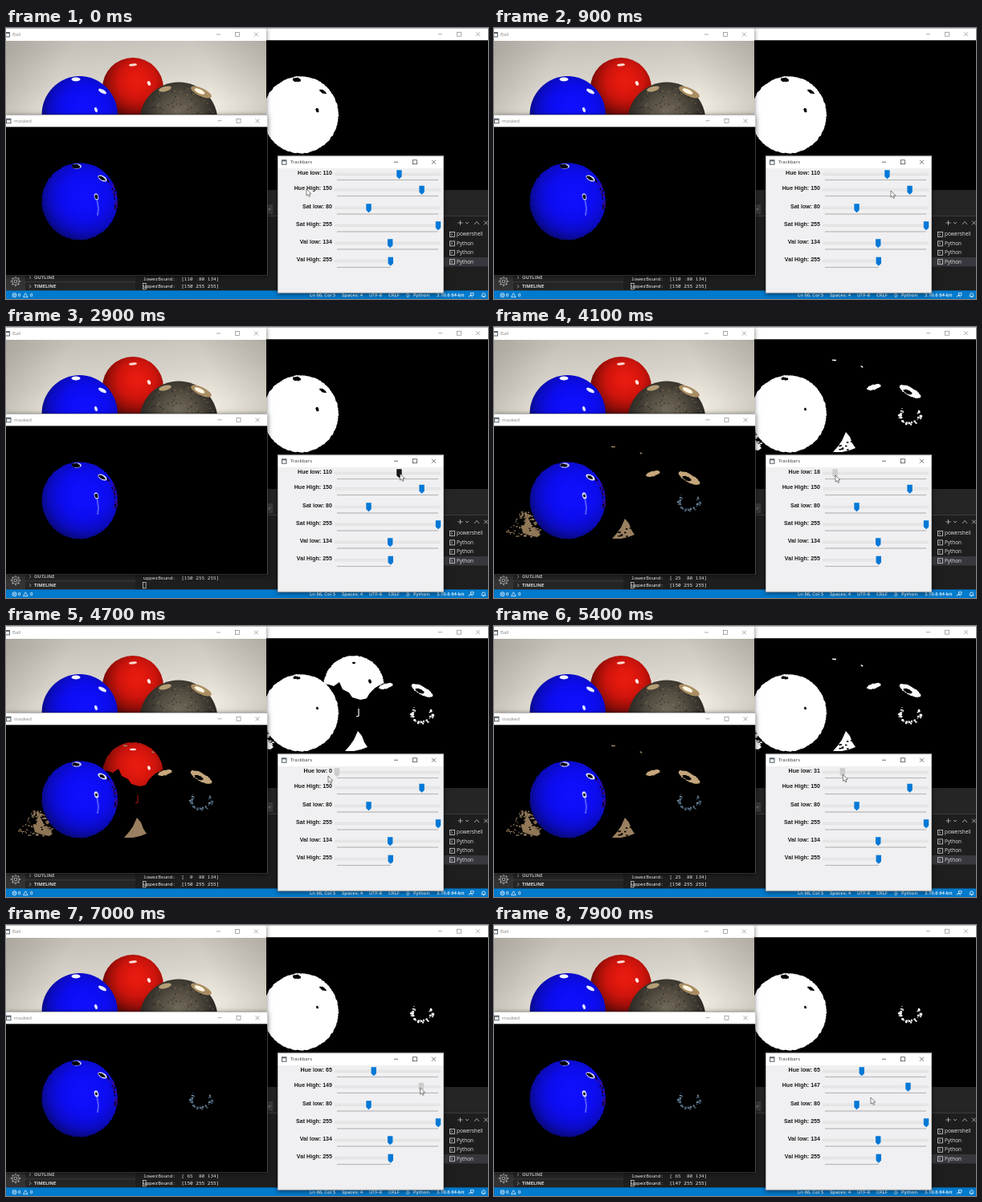
These frames come from a looping animation (600x338 px, 8 s). An HTML page with a canvas:

```html
<!DOCTYPE html>
<html lang="en">
<head>
<meta charset="utf-8">
<title>HSV trackbars</title>
<style>
html, body { margin: 0; width: 100%; height: 100%; overflow: hidden; background: #1e1e1e; }
canvas { display: block; width: 100vw; height: 100vh; }
</style>
</head>
<body>
<canvas id="stage" width="600" height="338"></canvas>
<script>
const ctx = document.getElementById('stage').getContext('2d');
const LOOP = 8000, STEP = 100;
const SANS = '"Open Sans", sans-serif';
const MONO = '"Noto Sans Mono", monospace';

// time, x, y of the pointer tip
const pointerKeys = [
  [0, 374, 201], [300, 374, 201], [900, 494, 203], [1300, 532, 194], [1800, 532, 194],
  [2500, 490.5, 183], [3400, 490.5, 183], [4000, 430, 185], [4100, 425, 185],
  [4400, 401, 187], [4800, 401, 187], [5200, 425, 186], [5900, 458, 184],
  [6200, 516, 203], [6900, 516, 203], [7400, 514, 203], [7800, 514, 203], [7801, 469, 215]
];
const lowKeys = [[3400, 110], [4000, 25], [4100, 18], [4400, 0], [4800, 0], [5200, 18], [5900, 65]];
const highKeys = [[6900, 150], [7400, 147]];

function at(keys, t, i = 1) {
  if (t <= keys[0][0]) return keys[0][i];
  for (let k = 1; k < keys.length; k++) {
    const a = keys[k - 1], b = keys[k];
    if (t <= b[0]) return a[i] + (b[i] - a[i]) * (t - a[0]) / (b[0] - a[0]);
  }
  return keys[keys.length - 1][i];
}

function random(seed) {
  let s = Math.floor(seed * 7919) >>> 0;
  return () => {
    s = (Math.imul(s, 1664525) + 1013904223) >>> 0;
    return s / 4294967296;
  };
}

function rect(x, y, w, h, color) {
  ctx.fillStyle = color;
  ctx.fillRect(x, y, w, h);
}

function text(str, x, y, size, color, font = SANS, weight = 400, align = 'left') {
  ctx.font = `${weight} ${size}px ${font}`;
  ctx.textAlign = align;
  ctx.textBaseline = 'middle';
  ctx.fillStyle = color;
  ctx.fillText(str, x, y);
}

function trace(points, closed) {
  ctx.beginPath();
  points.forEach(([x, y]) => ctx.lineTo(x, y));
  if (closed) ctx.closePath();
}

function poly(points, color) {
  trace(points, true);
  ctx.fillStyle = color;
  ctx.fill();
}

function line(points, color, width = 0.7) {
  trace(points);
  ctx.strokeStyle = color;
  ctx.lineWidth = width;
  ctx.stroke();
}

function oval(x, y, rx, ry, color, turn = 0) {
  ctx.beginPath();
  ctx.ellipse(x, y, rx, ry, turn, 0, 7);
  ctx.fillStyle = color;
  ctx.fill();
}

// ellipse with a ragged, thresholded edge
function ragged(x, y, rx, ry, color, turn = 0, rough = 1) {
  const next = random(x + y * 3), n = Math.max(14, Math.round(rx * 4)), pts = [];
  const c = Math.cos(turn), s = Math.sin(turn);
  for (let i = 0; i < n; i++) {
    const a = i / n * Math.PI * 2, d = (next() - 0.5) * rough;
    const u = (rx + d) * Math.cos(a), v = (ry + d) * Math.sin(a);
    pts.push([x + u * c - v * s, y + u * s + v * c]);
  }
  poly(pts, color);
}

function shade(x, y, r, ...colors) {
  const g = ctx.createRadialGradient(x, y, 1, x, y, r);
  colors.forEach((c, i) => g.addColorStop(i / (colors.length - 1), c));
  return g;
}

const blueShade = () => shade(98, 102, 58, '#1010ff', '#0e0efa', '#0c0cee', '#0b0bc4', '#080870');
const redShade = () => shade(163, 66, 46, '#ea1c10', '#e0180e', '#cc140c', '#9c0e08', '#5c0805');

function clipped(x, y, w, h, dx, dy, draw) {
  ctx.save();
  ctx.beginPath();
  ctx.rect(x, y, w, h);
  ctx.clip();
  ctx.translate(dx, dy);
  draw();
  ctx.restore();
}

function photo() {
  const g = ctx.createLinearGradient(140, 16, 150, 108);
  g.addColorStop(0, '#c6c2ba');
  g.addColorStop(0.5, '#d8d4cb');
  g.addColorStop(1, '#f2ede2');
  rect(0, 16, 324, 92, g);
  rect(0, 16, 324, 92, shade(160, 80, 190, 'rgba(90,86,76,0)', 'rgba(90,86,76,0)', 'rgba(90,86,76,.3)'));

  oval(158, 75, 38, 38, redShade());
  oval(158, 46, 5, 1.6, '#ffd9cf', -0.1);
  oval(178, 69, 2, 3, '#ffe9e2', -0.4);

  oval(215, 116, 48.5, 48.5, shade(215, 106, 56, '#716a5b', '#5a5346', '#3b372f', '#1d1b18'));
  const next = random(5);
  for (let i = 0; i < 130; i++) {
    const a = next() * 6.28, r = 45 * Math.sqrt(next());
    rect(215 + r * Math.cos(a), 116 + r * Math.sin(a), 1.8, 1.4,
      i % 2 ? 'rgba(172,150,112,.4)' : 'rgba(18,18,18,.5)');
  }
  oval(198, 76, 8, 3, '#b59d75', -0.25);
  oval(243, 80, 14, 5, '#a98d62', 0.45);
  oval(241, 79, 7, 2.6, '#fff6e2', 0.45);

  oval(91.7, 108.3, 47.2, 48.2, blueShade());
  oval(87, 64, 5.5, 2.4, '#f4f4ff');
  oval(120, 79, 5.5, 2.4, '#e8eaff', 0.5);
  oval(112, 102, 1.8, 3.2, '#dfe4ff', -0.3);
}

// pixels inside the hue range, in colour or as a white mask
function selection(low, white) {
  const pick = c => white ? '#fff' : c;

  if (low <= 6) {
    ragged(158, 75, 37.5, 38, pick(redShade()));
    poly([[118, 72], [127, 73], [133, 75], [140, 70], [144, 79], [152, 83], [156, 89], [166, 92],
      [176, 90], [190, 125], [118, 125]], '#000');
    line([[164, 103], [164, 112], [161, 113]], pick('#a01008'), 1.2);
    ragged(215, 116, 49, 49, '#000');
    const spot = white ? '#000' : '#ffe9e2';
    oval(178, 69, 1.8, 2.8, spot, -0.4);
    oval(158, 46, white ? 2 : 4, 1.2, spot);
  }

  if (low <= 27) {
    ragged(198, 75, 9, 3.2, pick('#c7a87c'), -0.25);
    ragged(243, 80.5, 15, 5, pick('#c4a67c'), 0.5);
    ragged(240, 81, 6, 2.3, '#000', 0.4, 0.8);
    ragged(148.5, 41.3, 2.6, 0.9, pick('#9c8462'), 0, 0.5);
    ragged(183, 49.5, 1.8, 0.9, pick('#9c8462'), 0.6, 0.4);
    poly([[163, 131], [168, 137], [171, 145], [175, 151], [167, 154], [158, 156], [147, 156],
      [153, 149], [158, 142]], pick('#9a8060'));
    poly([[38, 122], [43, 131], [47, 139], [58, 151], [54, 154], [44, 152], [36, 149], [34, 142], [39, 136]],
      pick('#8f7656'));
    const next = random(11);
    for (let i = 0; i < 110; i++) {
      const y = 122 + next() * 31, w = 6 + (y - 122) * 0.6;
      rect(40 + (next() - 0.6) * 2 * w, y, 1 + next() * 2.5, 1.4,
        i % 5 ? pick('#937a5a') : '#000');
    }
    for (let i = 0; low > 6 && i < 14; i++) {
      rect(152 + next() * 22, 142 + next() * 13, 2.5, 1.6, '#000');
    }
  }

  if (low <= 100) {
    const next = random(23);
    for (let i = 0; i < 38; i++) {
      const a = -0.6 + next() * 4.6, r = 10 + next() * 4.5;
      rect(242 + r * Math.cos(a), 109.5 + r * 0.82 * Math.sin(a), 1 + next() * 2, 1 + next() * 2,
        pick(i % 3 ? '#42566a' : '#7890a4'));
    }
  }

  ragged(91.7, 108.3, 47, 48, pick(blueShade()));
  if (!white) {
    const next = random(37);
    for (let i = 0; i < 40; i++) {
      const a = -0.7 + next() * 0.9, r = 43.5 + next() * 3;
      rect(91 + r * Math.cos(a), 108 + r * Math.sin(a), 1.6, 2, i % 3 ? '#3d0b88' : '#08000e');
    }
    line([[113.5, 107], [115, 117], [114, 126]], 'rgba(125,138,255,.6)', 2);
    oval(88, 64.5, 6, 3.2, '#b4b9f4');
    oval(120, 79.5, 6.2, 3.1, '#dfe2ff', 0.5);
    oval(112.5, 102.5, 2.6, 4.2, '#d4d9ff', -0.3);
  }
  const wide = low <= 27;
  ragged(87, 64.5, wide ? 4.5 : 5.2, wide ? 1.9 : 2.6, '#000', 0.1, 1);
  if (!wide || !white) ragged(119.5, 79.5, wide ? 3.6 : 4.8, 1.9, '#000', 0.5, 0.8);
  ragged(112.5, 102.5, low < 100 ? 1.5 : 2, low < 100 ? 1.9 : 2.9, '#000', -0.3, 0.6);
}

function titleBar(x, y, w, h, title, iconX, textX, active) {
  const ink = active ? '#333' : '#858585', mid = y + h / 2, right = x + w;
  rect(x, y, w, h, '#fff');
  rect(x, y, w, 0.6, '#8a8a8a');
  if (title) {
    rect(iconX, mid - 3, 6.5, 6.5, '#5c646b');
    rect(iconX + 1, mid - 1, 4.5, 3.5, '#eef2f5');
    text(title, textX, mid + 0.4, 6, ink);
  }
  line([[right - 62, mid], [right - 57, mid]], ink);
  ctx.strokeRect(right - 38.5, mid - 2.5, 5, 5);
  line([[right - 15, mid - 2.5], [right - 10, mid + 2.5]], ink);
  line([[right - 10, mid - 2.5], [right - 15, mid + 2.5]], ink);
}

function shadow(x, y, w, h) {
  ctx.save();
  ctx.shadowColor = 'rgba(0,0,0,.55)';
  ctx.shadowBlur = 6;
  ctx.shadowOffsetY = 1;
  rect(x, y, w, h, '#777');
  ctx.restore();
}

function editor(low, high, scrolled) {
  rect(0, 0, 600, 338, '#1e1e1e');
  rect(324, 202, 276, 33, '#252526');
  rect(324, 234, 276, 0.8, '#414141');
  rect(322, 220, 10, 12, '#3c3c3c');
  text('r', 327, 226, 6, '#ccc');

  line([[562.5, 243], [568.5, 243]], '#d5d5d5');
  line([[565.5, 240], [565.5, 246]], '#d5d5d5');
  line([[572, 242], [574, 244], [576, 242]], '#d5d5d5');
  line([[583, 245], [586, 241.5], [589, 245]], '#d5d5d5');
  line([[595, 240.5], [600, 245.5]], '#d5d5d5');
  line([[600, 240.5], [595, 245.5]], '#d5d5d5');
  rect(545, 286, 55, 11.5, '#37373d');
  ['powershell', 'Python', 'Python', 'Python'].forEach((name, i) => {
    const y = 257.5 + i * 11.4;
    ctx.strokeStyle = '#d5d5d5';
    ctx.lineWidth = 0.8;
    ctx.strokeRect(552.5, y - 3, 6, 6);
    line([[554, y - 1.5], [555.7, y], [554, y + 1.5]], '#d5d5d5');
    text(name, 561, y + 0.3, 6.4, '#e2e2e2', SANS, 500);
  });

  rect(0, 300, 24, 28, '#333');
  rect(24, 300, 137, 28, '#252526');
  rect(24, 316.5, 137, 0.7, '#454545');
  [['OUTLINE', 311], ['TIMELINE', 322.3]].forEach(([name, y]) => {
    line([[29, y - 2], [31, y], [29, y + 2]], '#ccc');
    text(name, 35, y + 0.3, 5.8, '#dcdcdc', SANS, 700);
  });
  ctx.strokeStyle = '#a0a0a0';
  ctx.lineWidth = 1.1;
  for (const r of [1.8, 4.2]) {
    ctx.beginPath();
    ctx.arc(12, 316, r, 0, 7);
    ctx.stroke();
  }
  for (let i = 0; i < 8; i++) {
    const c = Math.cos(i * Math.PI / 4), s = Math.sin(i * Math.PI / 4);
    line([[12 + 4.5 * c, 316 + 4.5 * s], [12 + 6.2 * c, 316 + 6.2 * s]], '#a0a0a0', 1.6);
  }

  const pad = n => String(n).padStart(3);
  const rows = [`lowerBound:  [${pad(low)}  80 134]`, `upperBound:  [${pad(high)} 255 255]`];
  if (scrolled) rows.shift();
  rows.forEach((row, i) => text(row, 171, 313.6 + i * 8.8, 6.05, '#f4f4f4', MONO, 500));
  ctx.strokeStyle = '#ddd';
  ctx.lineWidth = 0.7;
  ctx.strokeRect(170.5, 318.6, 3.6, 7.2);
}

function statusBar() {
  rect(0, 327.4, 600, 10.6, '#007acc');
  const y = 333.2;
  ctx.strokeStyle = '#fff';
  ctx.lineWidth = 0.8;
  ctx.beginPath();
  ctx.arc(10.5, y, 2.5, 0, 7);
  ctx.stroke();
  line([[9.3, y - 1.2], [11.7, y + 1.2]], '#fff');
  line([[11.7, y - 1.2], [9.3, y + 1.2]], '#fff');
  line([[21.5, y + 2.4], [24.3, y - 2.5], [27.1, y + 2.4], [21.5, y + 2.4]], '#fff');
  [['0', 15], ['0', 30], ['Ln 66, Col 5', 378], ['Spaces: 4', 418], ['UTF-8', 452], ['CRLF', 476],
    ['{}', 498], ['Python', 507], ['3.10.6 64-bit', 536]]
    .forEach(([s, x]) => text(s, x, y, 5.9, '#fff', SANS, 600));
  ctx.strokeStyle = '#fff';
  ctx.strokeRect(578.5, y - 2.5, 3.5, 2.6);
  line([[576, y + 2.6], [577, y + 0.6], [579.5, y + 0.6], [580.5, y + 2.6]], '#fff');
  line([[592, y + 1.5], [593.2, y - 2.2], [595.8, y - 2.2], [597, y + 1.5], [592, y + 1.5]], '#fff');
  rect(593.8, y + 1.8, 1.6, 1, '#fff');
}

function trackbars(low, high, lowColor, highColor) {
  shadow(338, 159.5, 207, 171);
  rect(338, 159.5, 207, 171, '#f0eff1');
  titleBar(338, 159.5, 207, 15.5, 'Trackbars', 343, 354, true);
  ctx.strokeStyle = '#8a8a8a';
  ctx.lineWidth = 0.6;
  ctx.strokeRect(338.3, 159.8, 206.4, 170.4);
  // label, value, position, label y, thumb y, tick y, tick end, thumb colour
  const blue = '#0078d7';
  [
    ['Hue low', low, low / 179, 181, 182.5, 189.5, 538, lowColor],
    ['Hue High', high, high / 179, 200.5, 202, 209.5, 538, highColor],
    ['Sat low', 80, 80 / 255, 223, 224.5, 232, 538, blue],
    ['Sat High', 255, 1, 245, 246.5, 254, 538, blue],
    ['Val low', 134, 134 / 255, 267.5, 268.5, 276, 538, blue],
    ['Val High', 255, 0.53, 289.5, 291, 298.5, 479, blue]
  ].forEach(([name, value, pos, labelY, y, tickY, end, color]) => {
    text(`${name}: ${value}`, 406, labelY, 7.1, '#1c1c1c', '"Liberation Sans", sans-serif', 700, 'right');
    rect(409.5, y - 1.7, end - 407, 3, '#d8d8d8');
    rect(410, y - 1.2, end - 408, 2, '#e9e9e9');
    rect(412, tickY - 0.6, end - 412, 1.2, '#b8b8b8');
    const x = 412 + pos * 126;
    poly([[x - 3.2, y - 5.2], [x + 3.2, y - 5.2], [x + 3.2, y + 2.7], [x, y + 5.7], [x - 3.2, y + 2.7]], color);
  });
}

function pointer(x, y) {
  const pts = [[0, 0], [0, 8.2], [1.9, 6.5], [3.2, 9.4], [4.6, 8.8], [3.4, 6], [5.9, 5.8]]
    .map(([a, b]) => [x + a, y + b]);
  poly(pts, '#fff');
  trace(pts, true);
  ctx.strokeStyle = '#333';
  ctx.lineWidth = 0.6;
  ctx.stroke();
}

function thumbColor(t, hover, press, release, leave) {
  if (t >= press && t < release) return '#cccccc';
  return t >= hover && t < leave ? '#171717' : '#0078d7';
}

function draw(t) {
  const low = Math.round(at(lowKeys, t)), high = Math.round(at(highKeys, t));
  const usedLow = Math.round(at(lowKeys, t - STEP)), usedHigh = Math.round(at(highKeys, t - STEP));

  editor(usedLow, usedHigh, t >= 2800 && t < 3100);
  statusBar();

  titleBar(324, 0, 276, 15.5, '', 0, 0, false);
  rect(324, 15.5, 276, 186.5, '#000');
  clipped(324, 16, 276, 186, 275, 0, () => selection(usedLow, true));

  shadow(0, 0, 324, 108);
  titleBar(0, 0, 324, 16, 'Ball', -1.5, 8, false);
  clipped(0, 15.5, 324, 92.5, 0, 0, photo);

  shadow(0, 108, 325.5, 200.7);
  titleBar(0, 108, 325.5, 15.5, 'masked', 0, 10, false);
  rect(0, 123.5, 325, 185, '#000');
  clipped(0, 123.5, 325, 185, 0, 108, () => selection(usedLow, false));

  trackbars(low, high, thumbColor(t, 2500, 3400, 6000, 6000), thumbColor(t, 6200, 6900, 7500, 7900));
  pointer(at(pointerKeys, t), at(pointerKeys, t, 2));
}

const start = performance.now();
let last = -1;
function tick() {
  const t = Math.floor((performance.now() - start) % LOOP / STEP) * STEP;
  if (t !== last) draw(last = t);
  requestAnimationFrame(tick);
}
tick();
</script>
</body>
</html>
```
